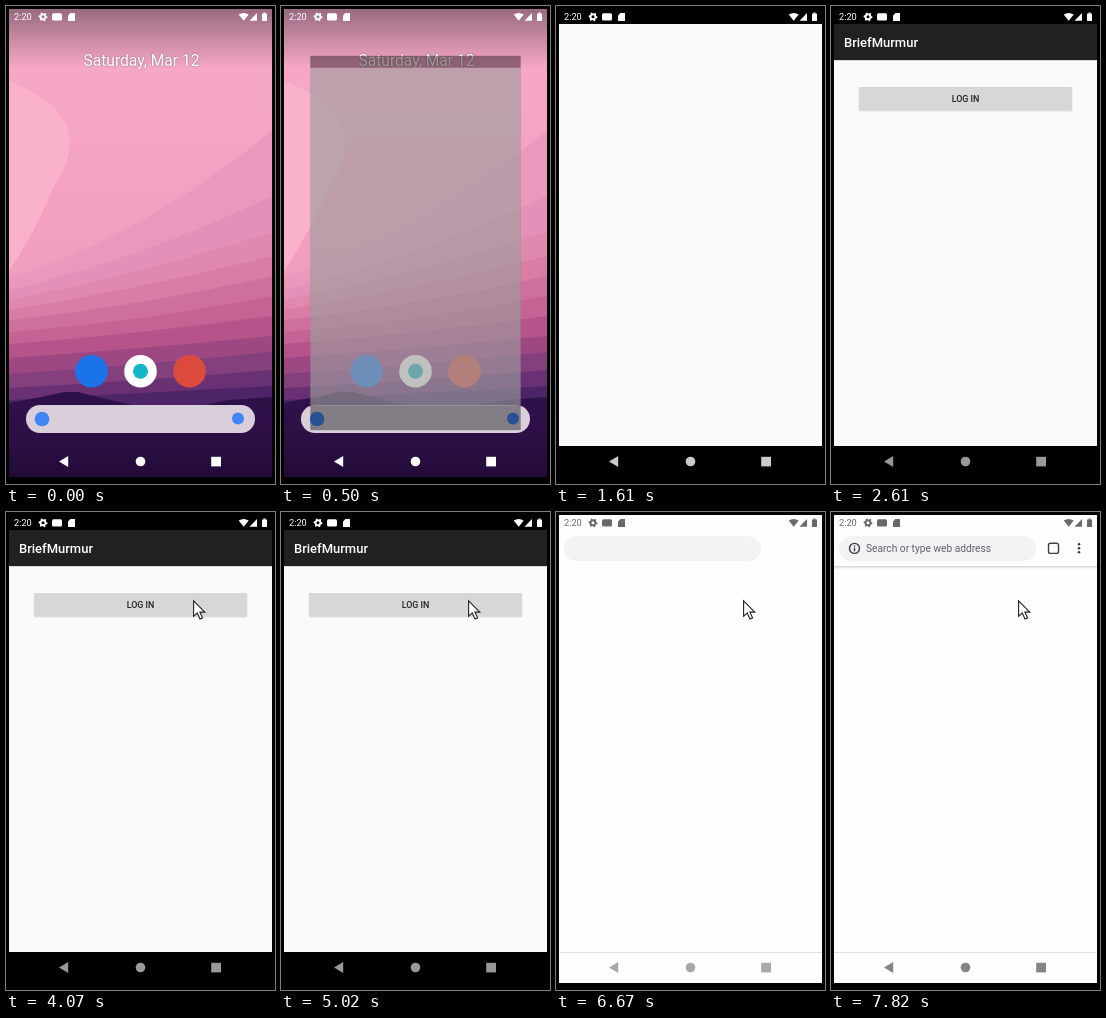
Write an HTML page with a canvas that moves like this. It is 269x478 px and loops after 8000 ms.

```html
<!DOCTYPE html>
<html lang="en">
<head>
<meta charset="utf-8">
<title>Phone screen</title>
<style>
  html, body { margin: 0; width: 100%; height: 100%; overflow: hidden; background: #000; }
  canvas { display: block; width: 269px; height: 478px; }
</style>
</head>
<body>
<canvas></canvas>
<script>
const W = 269, H = 478, LOOP = 8000;
const cv = document.querySelector('canvas'), c = cv.getContext('2d');
const dpr = window.devicePixelRatio || 1;
cv.width = W * dpr;
cv.height = H * dpr;

// Value of the last [time, value] entry already reached
const at = (t, keys) => keys.reduce((v, [k, next]) => t >= k ? next : v, null);

const rect = (x, y, w, h, fill) => { c.fillStyle = fill; c.fillRect(x, y, w, h); };

function round(x, y, w, h, r, fill) {
  c.beginPath();
  c.roundRect(x, y, w, h, r);
  c.fillStyle = fill;
  c.fill();
}

function disc(x, y, r, fill) {
  c.beginPath();
  c.arc(x, y, r, 0, 7);
  c.fillStyle = fill;
  c.fill();
}

function poly(fill, ...p) {
  c.beginPath();
  for (let i = 0; i < p.length; i += 2) c.lineTo(p[i], p[i + 1]);
  c.closePath();
  c.fillStyle = fill;
  c.fill();
}

function text(s, x, y, size, fill, weight = 400, align = 'left') {
  c.font = `${weight} ${size}px Roboto, sans-serif`;
  c.textAlign = align;
  c.fillStyle = fill;
  c.fillText(s, x, y);
}

function fade(y0, y1, from, to) {
  const g = c.createLinearGradient(0, y0, 0, y1);
  g.addColorStop(0, from);
  g.addColorStop(1, to);
  rect(3, Math.min(y0, y1), 263, Math.abs(y1 - y0), g);
}

// Dune edges: height at left, middle and right, then colour
const DUNES = [
  [272, 215, 125, '#eb98bd'], [284, 245, 190, '#e590b8'],
  [294, 264, 226, '#e088ae'], [304, 280, 250, '#d97da6'],
  [314, 296, 270, '#ce709d'], [326, 312, 290, '#c46394'],
  [338, 326, 310, '#b5538a'], [352, 342, 330, '#9d4883'],
  [368, 358, 346, '#84407d'], [382, 374, 364, '#693174'],
  [394, 387, 380, '#4d2468'],
];

function wallpaper() {
  fade(3, 471, '#f8aac9', '#eb93b8');
  c.beginPath();
  c.moveTo(3, 75);
  c.quadraticCurveTo(95, 110, 48, 180);
  c.quadraticCurveTo(30, 225, 3, 265);
  c.fillStyle = '#fab2cb';
  c.fill();
  for (const [l, m, r, fill] of DUNES) {
    c.beginPath();
    c.moveTo(3, l);
    c.quadraticCurveTo(134, 2 * m - (l + r) / 2, 266, r);
    c.lineTo(266, 471);
    c.lineTo(3, 471);
    c.fillStyle = fill;
    c.fill();
  }
  poly('#2f1149', 3, 397, 40, 390, 58, 386, 72, 386, 92, 391, 130, 400,
    190, 401, 222, 394, 266, 391, 266, 471, 3, 471);
  fade(405, 471, '#2a0e4200', '#220a38');
}

function home() {
  fade(3, 62, '#5a40509a', '#5a405000');
  c.shadowColor = '#0006';
  c.shadowBlur = 2 * dpr;
  text('Saturday, Mar 12', 135.5, 60, 15.6, '#fff', 400, 'center');
  c.shadowBlur = 0;
  disc(85.5, 365.3, 16.3, '#1a73e8');
  disc(134.5, 365.3, 16.3, '#fff');
  disc(134.5, 365.3, 7.5, '#12b5c9');
  disc(183.5, 365.3, 16.3, '#db4a3c');
  round(20, 399, 229, 28, 14, '#d8cfdb');
  disc(36, 413, 7.3, '#4285f4');
  disc(232, 412.5, 6, '#4285f4');
}

function blankApp() {
  rect(3, 3, 263, 468, '#000');
  rect(3, 18, 263, 422, '#fafafa');
}

function loginApp(pressed) {
  blankApp();
  rect(3, 54, 263, 1, '#d8d8d8');
  rect(3, 18, 263, 36, '#212121');
  text('BriefMurmur', 13, 41.3, 13, '#fff', 500);
  round(27.5, 81, 214, 24.5, 1.5, '#e6e6e6');
  round(28.2, 81, 212.6, 23.7, 1, pressed ? '#c3c4c4' : '#d6d7d7');
  text('LOG IN', 134.5, 96.3, 8.9, '#222', 500, 'center');
}

function blankBrowser() {
  rect(3, 3, 263, 468, '#fefefe');
  rect(3, 440, 263, 1, '#e0e0e0');
}

function toolbar(t) {
  round(8, 24, 197, 25, 12.5, '#f1f3f4');
  if (t < 7390) return;
  c.strokeStyle = '#3c4043';
  c.lineWidth = 1.4;
  c.beginPath();
  c.arc(23.5, 36.4, 5, 0, 7);
  c.stroke();
  c.beginPath();
  c.roundRect(217.5, 31.2, 10, 10.2, 2);
  c.stroke();
  rect(22.8, 35.7, 1.4, 3.6, '#3c4043');
  rect(22.8, 33.4, 1.4, 1.4, '#3c4043');
  text('Search or type web address', 35, 40.3, 10.2, '#5f6368');
  for (const y of [32.3, 36.3, 40.3]) disc(248, y, 1.3, '#3c4043');
  if (t >= 7540) {
    rect(3, 54, 263, 1, '#d9d9d9');
    rect(3, 55, 263, 1, '#e9e9e9');
    rect(3, 56, 263, 1, '#f5f5f5');
  }
}

// Draws a window scaled about the screen centre, or with its left edge at x
function win(draw, scale, x) {
  c.save();
  c.translate(x === undefined ? 134.5 - 131.5 * scale : x, 237 - 234 * scale);
  c.scale(scale, scale);
  c.translate(-3, -3);
  draw();
  c.restore();
}

function gear(x, y, fill) {
  c.beginPath();
  for (let i = 0; i < 24; i++) {
    const a = i * Math.PI / 12, r = i % 4 < 2 ? 4.5 : 3.4;
    c.lineTo(x + r * Math.cos(a), y + r * Math.sin(a));
  }
  c.closePath();
  c.moveTo(x + 1.5, y);
  c.arc(x, y, 1.5, 0, 7);
  c.fillStyle = fill;
  c.fill('evenodd');
}

function statusBar(fill) {
  text('2:20', 8, 14.2, 9.2, fill);
  gear(37, 10.8, fill);
  round(46, 7.2, 10, 7.2, 1.5, fill);
  poly(fill, 64.5, 7, 69, 7, 69, 15, 62, 15, 62, 9.5);
  c.beginPath();
  c.moveTo(237.7, 14.8);
  c.lineTo(232.7, 8.6);
  c.quadraticCurveTo(237.7, 5.2, 242.7, 8.6);
  c.fillStyle = fill;
  c.fill();
  poly(fill, 251, 7, 251, 14.7, 243.5, 14.7);
  round(256, 7.4, 5, 7.6, 0.6, fill);
  rect(257.4, 6.5, 2.2, 1.2, fill);
}

function navBar(fill) {
  poly(fill, 53, 455.5, 62.2, 450, 62.2, 461);
  disc(134.5, 455.5, 4.8, fill);
  rect(205.2, 450.8, 9.8, 9.6, fill);
}

function pointer(x, y) {
  c.save();
  c.translate(x + 0.6, y + 0.8);
  poly('#fff', 0, 0, 0, 15.5, 3.6, 12.2, 6.4, 18.3, 9, 17.2, 6.3, 11.3, 11.2, 11.3);
  c.strokeStyle = '#222';
  c.lineWidth = 1.1;
  c.stroke();
  c.restore();
}

function opening(t) {
  wallpaper();
  home();
  const step = at(t, [[500, [0.8, 0.4]], [650, [0.93, 0.86]], [770, [0.992, 0.97]]]);
  if (!step) return;
  c.globalAlpha = step[1];
  win(blankApp, step[0]);
  c.globalAlpha = 1;
}

function switching(t) {
  const [x, scale] = at(t, [[6280, [90, 0.957]], [6400, [30, 0.957]], [6550, [9, 0.975]]]);
  wallpaper();
  win(() => loginApp(false), scale, x - 12 - 263 * scale);
  win(blankBrowser, scale, x);
}

function draw(t) {
  c.setTransform(dpr, 0, 0, dpr, 0, 0);
  rect(0, 0, W, H, '#000');
  c.save();
  c.beginPath();
  c.rect(3, 3, 263, 468);
  c.clip();
  if (t < 920) opening(t);
  else if (t < 2610) blankApp();
  else if (t < 6280) loginApp(t >= 4750 && t < 5020);
  else if (t < 6670) switching(t);
  else {
    blankBrowser();
    toolbar(t);
  }
  statusBar(t < 6670 ? '#fff' : '#696969');
  navBar(at(t, [[0, '#fff'], [1310, '#e6e6e6'], [1610, '#cbcbcb'], [1730, '#b5b5b5'],
    [2030, '#999'], [6280, '#ffffffb8'], [6670, '#a8a8a8'], [7390, '#848484']]));
  c.restore();
  const tip = at(t, [[3680, [218, 65]], [3800, [213, 65]], [3940, [192, 82]], [4070, [187, 88]]]);
  if (tip) pointer(...tip);
}

function tick() {
  draw(performance.now() % LOOP);
  requestAnimationFrame(tick);
}
tick();
</script>
</body>
</html>
```
